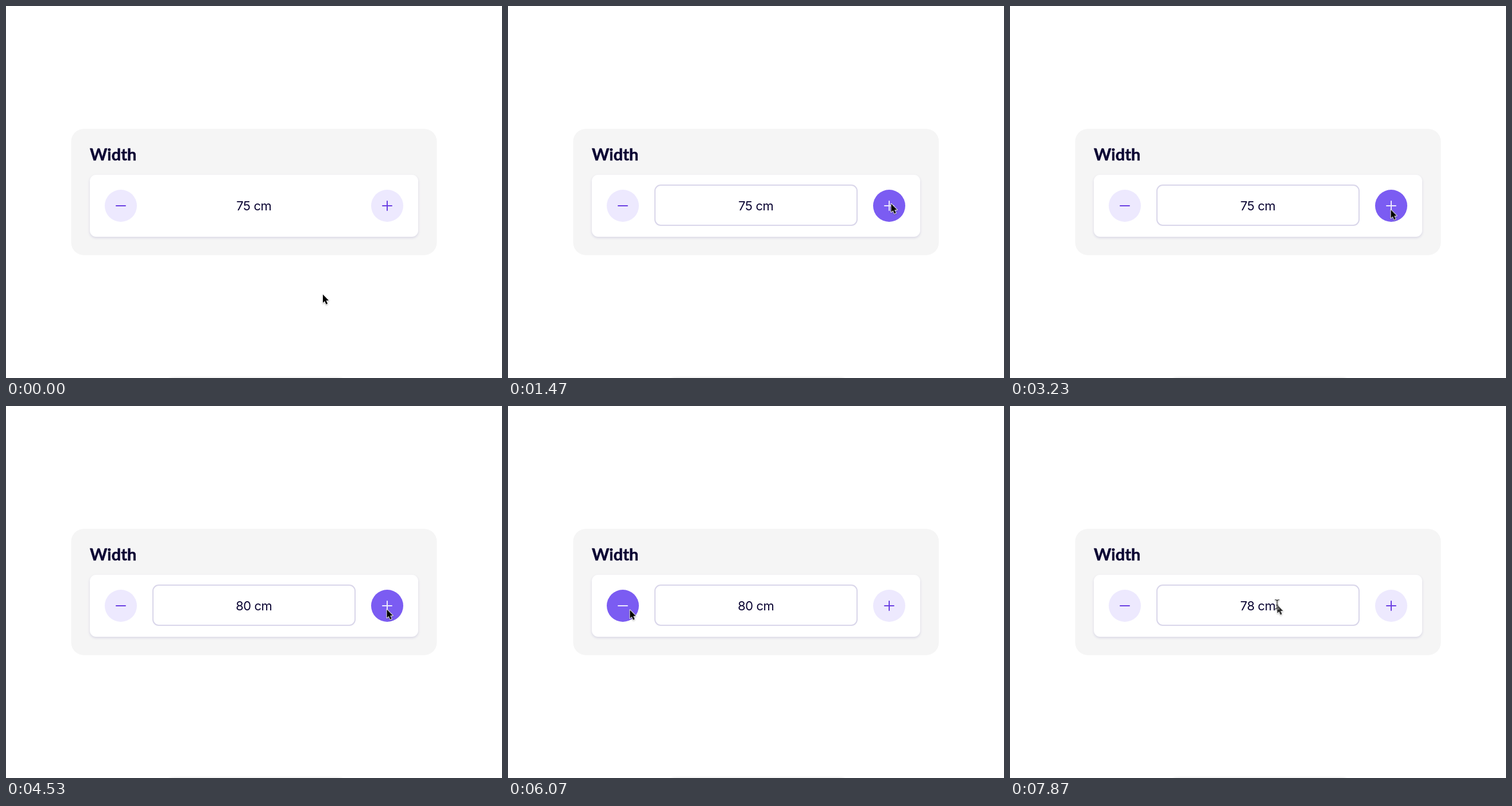
Write an HTML page that moves like this. It is 864 px wide and 648 px high and loops after 8000 ms.

```html
<!DOCTYPE html>
<html lang="en">
<head>
<meta charset="utf-8">
<title>Width stepper</title>
<style>
  html, body { margin: 0; width: 100%; height: 100%; overflow: hidden; background: #fff; }
  svg { display: block; width: 864px; height: 648px; }
  .title { font: 700 29px Lato, sans-serif; fill: #0b0533; stroke: #0b0533; stroke-width: .5px; }
  .value { font: 400 22px Inter, sans-serif; letter-spacing: -.02em; text-anchor: middle; fill: #0b0533; opacity: 0; }
  .card { fill: #fff; filter: drop-shadow(0 2px 2px rgba(70, 55, 140, .16)); }
  .field { fill: none; stroke: #d9d6ea; stroke-width: 2; opacity: 0; }
  .button circle { fill: #ede9fe; }
  .button path { fill: none; stroke: #6a3fe2; stroke-width: 2; stroke-linecap: round; }
  .dock { opacity: .12; filter: blur(2px); }
  #arrow, #beam { filter: drop-shadow(0 1px 1px rgba(0, 0, 0, .3)); }
  #arrow { stroke: #fff; stroke-width: 1.8; stroke-linejoin: round; paint-order: stroke; }
  #beam { fill: none; opacity: 0; }
</style>
</head>
<body>
<svg viewBox="0 0 864 648">
  <rect class="dock" x="282" y="648" width="306" height="40" rx="8"/>
  <rect x="113.5" y="214" width="637" height="220" rx="22" fill="#f5f5f5"/>
  <text class="title" x="146" y="268.5">Width</text>
  <rect class="card" x="146" y="294" width="572" height="108" rx="11"/>
  <rect class="field" id="field" x="256" y="312" width="352" height="70" rx="10"/>
  <g class="button" id="minus" transform="translate(200 348)">
    <circle r="28"/><path d="M-8 0H8"/>
  </g>
  <g class="button" id="plus" transform="translate(664 348)">
    <circle r="28"/><path d="M-8 0H8M0-8V8"/>
  </g>
  <g id="values"></g>
  <g id="cursor">
    <path id="arrow" d="M1 1.5V16l3.2-3 2.4 5.7 2.6-1.1-2.4-5.6H11.2Z"/>
    <g id="beam">
      <path d="M-3-7.5Q.8-7.5.8-5V6Q.8 8.5-3 8.5M4.6-7.5Q.8-7.5.8-5V6Q.8 8.5 4.6 8.5M-1 2H2.6" stroke="#fff" stroke-width="2.6"/>
      <path d="M-3-7.5Q.8-7.5.8-5V6Q.8 8.5-3 8.5M4.6-7.5Q.8-7.5.8-5V6Q.8 8.5 4.6 8.5M-1 2H2.6" stroke="#111" stroke-width="1.2"/>
    </g>
  </g>
</svg>
<script>
  const LOOP = 8000, FADE = 150;
  const FADE_EASE = 'cubic-bezier(.4, 0, .2, 1)';
  const IN_OUT = 'cubic-bezier(.4, 0, .4, 1)';
  const OUT = 'cubic-bezier(.3, .4, .4, 1)';
  const find = selector => document.querySelector(selector);

  // steps: [time in ms, value, easing towards the next step]
  function play(element, property, steps) {
    const frames = steps.map(([time, value, easing = 'linear']) =>
      ({ offset: time / LOOP, [property]: value, easing }));
    const animation = element.animate(frames, { duration: LOOP, iterations: Infinity });
    animation.startTime = 0;
    animation.startTime = document.timeline.currentTime;
  }

  function fade(element, property, rest, active, spans) {
    const steps = [[0, rest]];
    for (const [start, end] of spans) {
      steps.push([start, rest, FADE_EASE], [start + FADE, active], [end, active, FADE_EASE]);
      if (end < LOOP) steps.push([end + FADE, rest]);
    }
    if (steps.at(-1)[0] < LOOP) steps.push([LOOP, rest]);
    play(element, property, steps);
  }

  function hover(id, spans) {
    fade(find(`#${id} circle`), 'fill', '#ede9fe', '#7b5cf2', spans);
    fade(find(`#${id} path`), 'stroke', '#6a3fe2', '#ede9fe', spans);
  }

  hover('plus', [[1250, 2390], [3030, 4850]]);
  hover('minus', [[5890, 6870]]);
  fade(find('#field'), 'opacity', 0, 1, [[1190, 2410], [3000, 4865], [5780, 6890], [7430, LOOP]]);

  const counts = [[0, 75], [3500, 76], [3830, 77], [4030, 78], [4230, 79], [4470, 80], [6330, 79], [6500, 78]];
  counts.forEach(([start, count], i) => {
    const end = counts[i + 1]?.[0] ?? LOOP;
    const label = document.createElementNS('http://www.w3.org/2000/svg', 'text');
    label.setAttribute('class', 'value');
    label.setAttribute('x', 431.8);
    label.setAttribute('y', 356);
    label.textContent = `${count} cm`;
    find('#values').append(label);
    const hold = 'steps(1, end)';
    const steps = [[start, 1, hold]];
    if (start > 0) steps.unshift([0, 0, hold]);
    if (end < LOOP) steps.push([end, 0, hold], [LOOP, 0]);
    else steps.push([LOOP, 1]);
    play(label, 'opacity', steps);
  });

  const route = [
    [0, 551, 501], [830, 551, 501, IN_OUT],
    [1470, 666.5, 343, OUT], [1600, 666, 339], [1870, 666, 339], [1930, 666, 338],
    [2200, 666, 338, IN_OUT], [2530, 665, 481], [2770, 665, 481, IN_OUT],
    [3230, 662.5, 353.5], [3330, 662.5, 353],
    [4700, 662.5, 353, IN_OUT], [5070, 513, 532.5],
    [5500, 513, 532.5, IN_OUT], [6200, 200, 347],
    [6800, 200, 347, 'ease-in'], [6930, 303, 478.5, OUT], [7100, 398, 524],
    [7200, 425, 520, IN_OUT], [7600, 458, 379, OUT],
    [7870, 464.5, 345], [LOOP, 464.5, 345]
  ];
  play(find('#cursor'), 'transform',
    route.map(([time, x, y, easing]) => [time, `translate(${x}px, ${y}px)`, easing]));

  play(find('#beam'), 'opacity', [[0, 0], [7760, 0], [7870, 1], [LOOP, 1]]);
  play(find('#arrow'), 'opacity', [[0, 1], [7760, 1], [7870, .85], [LOOP, .85]]);
</script>
</body>
</html>
```
